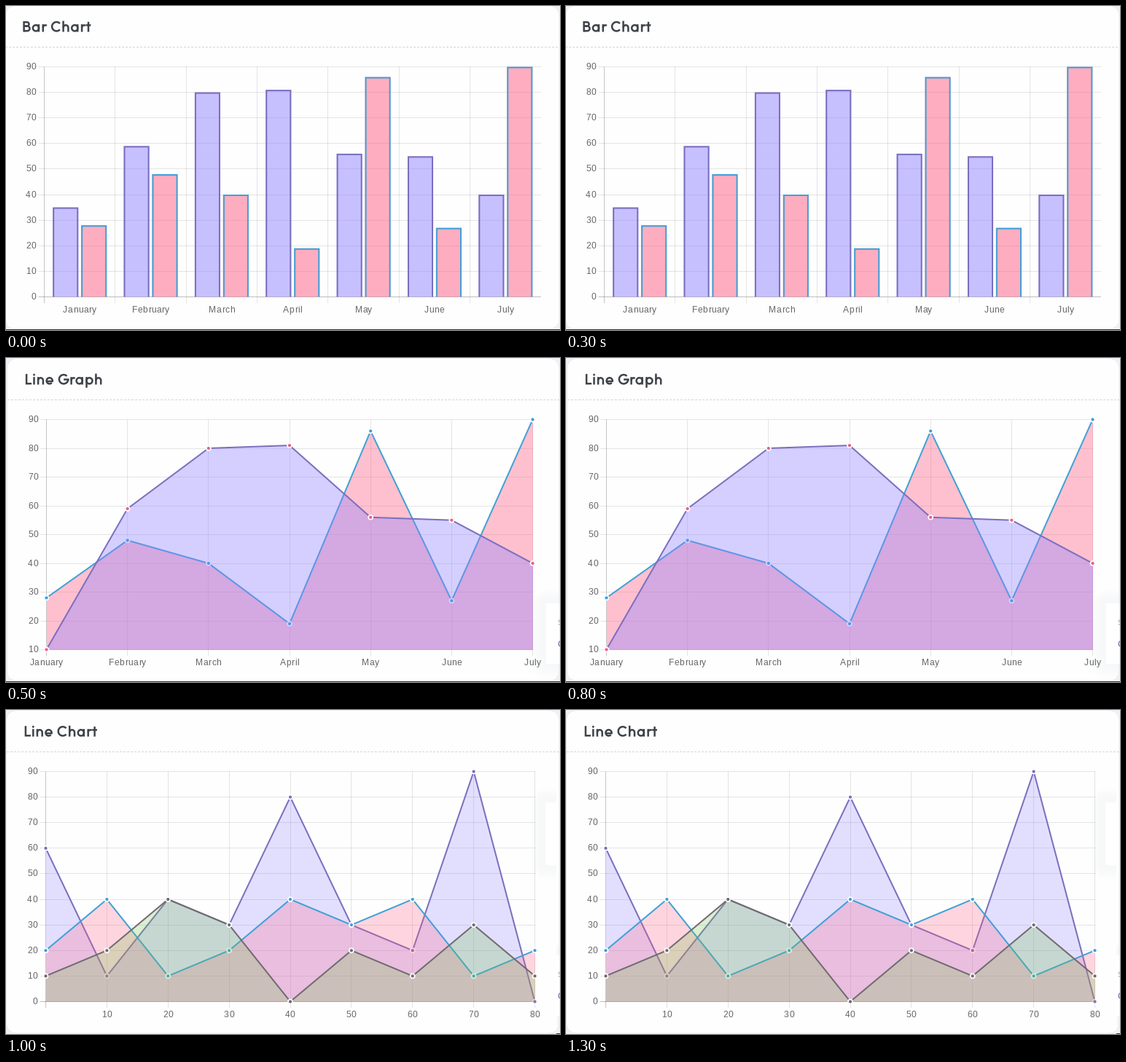
Recreate the animation shown at these times as a matplotlib script. Size 760 by 445 pixels, loop 1.5 s.

```python
import numpy as np
import matplotlib.pyplot as plt
from matplotlib.animation import FuncAnimation
from matplotlib.patches import Circle, FancyBboxPatch, Rectangle
from matplotlib.textpath import TextPath

W, H, DPI = 760, 445, 100
PX = 72 / DPI  # points per pixel
plt.rcParams["font.family"] = "Liberation Sans"
plt.rcParams["path.snap"] = False  # coordinates already sit on pixel centres

PAGE, INK, LABEL = "#f0f1f5", "#3f4349", "#666666"
PURPLE, BLUE, GREY, PINK = "#7a6fbe", "#40a0d6", "#706b70", "#ef5f86"
PURPLE_FILL = (144 / 255, 131 / 255, 1)
PINK_FILL = (1, 93 / 255, 131 / 255)
GREEN_FILL = (115 / 255, 195 / 255, 78 / 255)

MONTHS = ["January", "February", "March", "April", "May", "June", "July"]
BARS_A = [35, 59, 80, 81, 56, 55, 40]
BARS_B = [28, 48, 40, 19, 86, 27, 90]
LINE_A = [10] + BARS_A[1:]
SPIKES = [60, 10, 40, 30, 80, 30, 20, 90, 0]
WAVES = [20, 40, 10, 20, 40, 30, 40, 10, 20]
HILLS = [10, 20, 40, 30, 0, 20, 10, 30, 10]

fig = plt.figure(figsize=(W / DPI, H / DPI), dpi=DPI, facecolor=PAGE)
ax = fig.add_axes([0, 0, 1, 1])


# --- title lettering: geometric strokes, y up from the baseline ---

def arc(cx, cy, r, start, end):
    a = np.radians(np.linspace(start, end, 40))
    return list(zip(cx + r * np.cos(a), cy + r * np.sin(a)))


def stem(x, low, high):
    return [(x, low), (x, high)]


ARCH = arc(6.4, 5.8, 3.4, 180, 0) + [(9.8, 0)]
# letter: (advance, strokes)
LETTERS = {
    "B": (13.3, [stem(3, 0, 14.6),
                 [(3, 13.3)] + arc(7.2, 10.6, 2.7, 90, -90) + [(3, 7.9)],
                 [(3, 7.9)] + arc(7.6, 4.6, 3.3, 90, -90) + [(3, 1.3)]]),
    "C": (14.6, [arc(8.3, 7.3, 6.2, 42, 318)]),
    "G": (15.8, [arc(8.3, 7.3, 6.2, 45, 358), [(8.4, 7), (15.7, 7)]]),
    "L": (10.5, [[(3, 14.6), (3, 1.3), (10, 1.3)]]),
    "a": (12.9, [arc(6.1, 5.2, 4.1, 0, 360), stem(10, 0, 10.4)]),
    "e": (11.9, [arc(6, 5.2, 4.1, -8, 318), [(2, 4.5), (11.2, 4.5)]]),
    "h": (12.6, [stem(3, 0, 15), ARCH]),
    "i": (5.5, [stem(2.9, 0, 10.4), stem(2.9, 12.1, 14.8)]),
    "n": (12.6, [stem(3, 0, 10.4), ARCH]),
    "p": (12.9, [stem(3, -4.3, 10.4), arc(6.9, 5.2, 4.1, 0, 360)]),
    "r": (8.0, [stem(3, 0, 10.4), arc(6.2, 5.9, 3.2, 180, 55)]),
    "t": (7.7, [stem(3.9, 0, 13.8), [(0.5, 9.1), (7.3, 9.1)]]),
    " ": (5.2, []),
}


def title(text, x, base):
    x -= 1.7
    for ch in text:
        advance, strokes = LETTERS[ch]
        for s in strokes:
            line([x + p[0] for p in s], [base - p[1] for p in s], INK, 2.5)
        x += advance


# --- basic parts ---

def line(xs, ys, color, width=1.0, **kw):
    kw.setdefault("solid_capstyle", "butt")
    ax.plot(xs, ys, color=color, lw=width * PX, solid_joinstyle="miter", **kw)


def rect(x, y, w, h, color, **kw):
    ax.add_patch(Rectangle((x, y), w, h, fc=color, ec="none", lw=0, snap=False,
                           **kw))


def ink_width(s):
    return TextPath((0, 0), s, size=12).get_extents().width


advances = {}


def advance_of(ch):
    if ch not in advances:
        advances[ch] = ink_width("n" + ch + "n") - ink_width("nn")
    return advances[ch]


def label(text, x, base, align):
    """Text with half a pixel of letter spacing; align 0.5 centre, 1 right."""
    steps = [advance_of(c) + 0.5 for c in text]
    x -= align * sum(steps)
    for ch, step in zip(text, steps):
        ax.text(x, base, ch, fontsize=12 * PX, color=LABEL,
                ha="left", va="baseline", zorder=2)
        x += step


def card(x, y, heading, title_x):
    rect(0, 0, W, H, PAGE, zorder=0)
    ax.add_patch(FancyBboxPatch(
        (x, y), 759 - x, 444 - y, boxstyle="round,pad=0,rounding_size=16",
        fc="#fefefe", ec="#eaecf0", lw=0.8 * PX, zorder=0.1))
    rule = y + 57
    line([np.ceil(x), 759], [rule, rule], "#d2d4d7", dashes=(3, 2),
         dash_capstyle="butt")
    title(heading, title_x, y + 36)


def grid(left, right, top, bottom, low, xs, foot):
    """Gridlines with tick marks and value labels; returns the value scale."""
    scale = (bottom - top) / (90 - low)
    for v in range(low, 91, 10):
        y = np.floor(bottom - (v - low) * scale) + 0.5
        line([left - 8, right], [y, y], (0, 0, 0, 0.25 if v == 0 else 0.1),
             zorder=1)
        label(str(v), left - 11, y + 3.7, 1)
    for i, x in enumerate(xs):
        x = np.floor(x) + 0.5
        line([x, x], [top, foot], (0, 0, 0, 0.1 if i else 0.22), zorder=1)
    return lambda v: bottom - (np.asarray(v) - low) * scale


def area(xs, ys, floor, fill, alpha, stroke, dot, z):
    ax.fill_between(xs, ys, floor, color=fill, alpha=alpha, lw=0, zorder=z)
    line(xs, ys, stroke, 2, zorder=z + 0.1)
    for x, y in zip(xs, ys):
        ax.add_patch(Circle((x, y), 3.9, fc="white", ec="none", zorder=z + 0.2))
        ax.add_patch(Circle((x, y), 2.1, fc=dot, ec="none", zorder=z + 0.3))


def popup(left, top, bottom, x0, x1):
    """Pale panel with a soft shadow, seen between x0 and x1."""
    y0, y1 = top - 30, min(bottom + 30, 440)
    x, y = np.meshgrid(np.arange(x0, x1) + 0.5, np.arange(y0, y1) + 0.5)
    dx = np.maximum(left - x, 0)
    dy = np.maximum(np.maximum(top - y, y - bottom), 0)
    d = np.hypot(dx, dy)
    img = np.empty(x.shape + (4,))
    img[..., :3] = (0.45, 0.5, 0.56)
    img[..., 3] = 0.045 * np.exp(-(d / 16) ** 4)
    img[d == 0] = (1, 1, 1, 1)
    ax.imshow(img, extent=(x0, x1, y1, y0), aspect="auto",
              interpolation="nearest", zorder=1.5)


def clipped_letters():
    for ch, base, size, color in (("S", 367, 11, "#a5a9ae"),
                                  ("C", 397, 13, "#7068a8")):
        t = ax.text(756, base, ch, fontsize=size * PX, color=color, zorder=3)
        t.set_clip_path(Rectangle((0, 0), 759, H, transform=ax.transData))


def bottom_edge(x0):
    rect(x0, 444, W - x0, 1, "#32363d", zorder=3)


# --- the three charts ---

def bar_chart():
    card(-1, -0.5, "Bar Chart", 23.3)
    left, step = 52.5, 681.5 / 7
    to_y = grid(left, 734, 83.5, 399.5, 0, left + step * np.arange(7), 408)
    slot = step * 0.4
    for i, name in enumerate(MONTHS):
        start = left + step * i
        label(name, start + step / 2, 421, 0.5)
        pairs = ((BARS_A[i], PURPLE_FILL, PURPLE), (BARS_B[i], PINK_FILL, BLUE))
        for k, (value, fill, edge) in enumerate(pairs):
            x = start + step * 0.1 + slot * (k + 0.05)
            w, y = slot * 0.9, to_y(value)
            rect(x, y, w, 399.5 - y, fill, alpha=0.5, zorder=2)
            line([x + 1, x + 1, x + w - 1, x + w - 1],
                 [399.5, y + 1, y + 1, 399.5], edge, 2, zorder=2.1)
    bottom_edge(0)


def line_graph():
    card(1.5, 0.5, "Line Graph", 26.8)
    xs = np.linspace(55.5, 722.5, 7)
    to_y = grid(55.5, 723, 84.5, 400.5, 10, xs, 409)
    for x, name in zip(xs, MONTHS):
        label(name, x, 422, 0.5)
    popup(741, 337, 420, 715, 759)
    clipped_letters()
    area(xs, to_y(BARS_B), 400.5, PINK_FILL, 0.38, BLUE, "#36a2e0", 4)
    area(xs, to_y(LINE_A), 400.5, PURPLE_FILL, 0.38, PURPLE, PINK, 5)
    bottom_edge(0)


def line_chart():
    card(0.5, 0.5, "Line Chart", 25.6)
    xs = np.linspace(54.5, 725.5, 9)
    to_y = grid(54.5, 726, 84.5, 400.5, 0, xs, 409)
    for i, x in enumerate(xs[1:], 1):
        label(str(10 * i), x, 422, 0.5)
    popup(740, 127, 213, 715, 755)
    popup(741, 337, 420, 755, 759)
    clipped_letters()
    area(xs, to_y(SPIKES), 400.5, PURPLE_FILL, 0.25, PURPLE, PURPLE, 4)
    area(xs, to_y(WAVES), 400.5, PINK_FILL, 0.25, BLUE, BLUE, 5)
    area(xs, to_y(HILLS), 400.5, GREEN_FILL, 0.25, GREY, GREY, 6)
    bottom_edge(755)


SCENES = [bar_chart, line_graph, line_chart]


def draw(i):
    ax.clear()
    ax.axis("off")
    SCENES[i]()
    ax.set_xlim(0, W)
    ax.set_ylim(H, 0)
    return []


anim = FuncAnimation(fig, draw, frames=len(SCENES), interval=500,
                     repeat=True, repeat_delay=0, blit=False)
plt.show()
```
